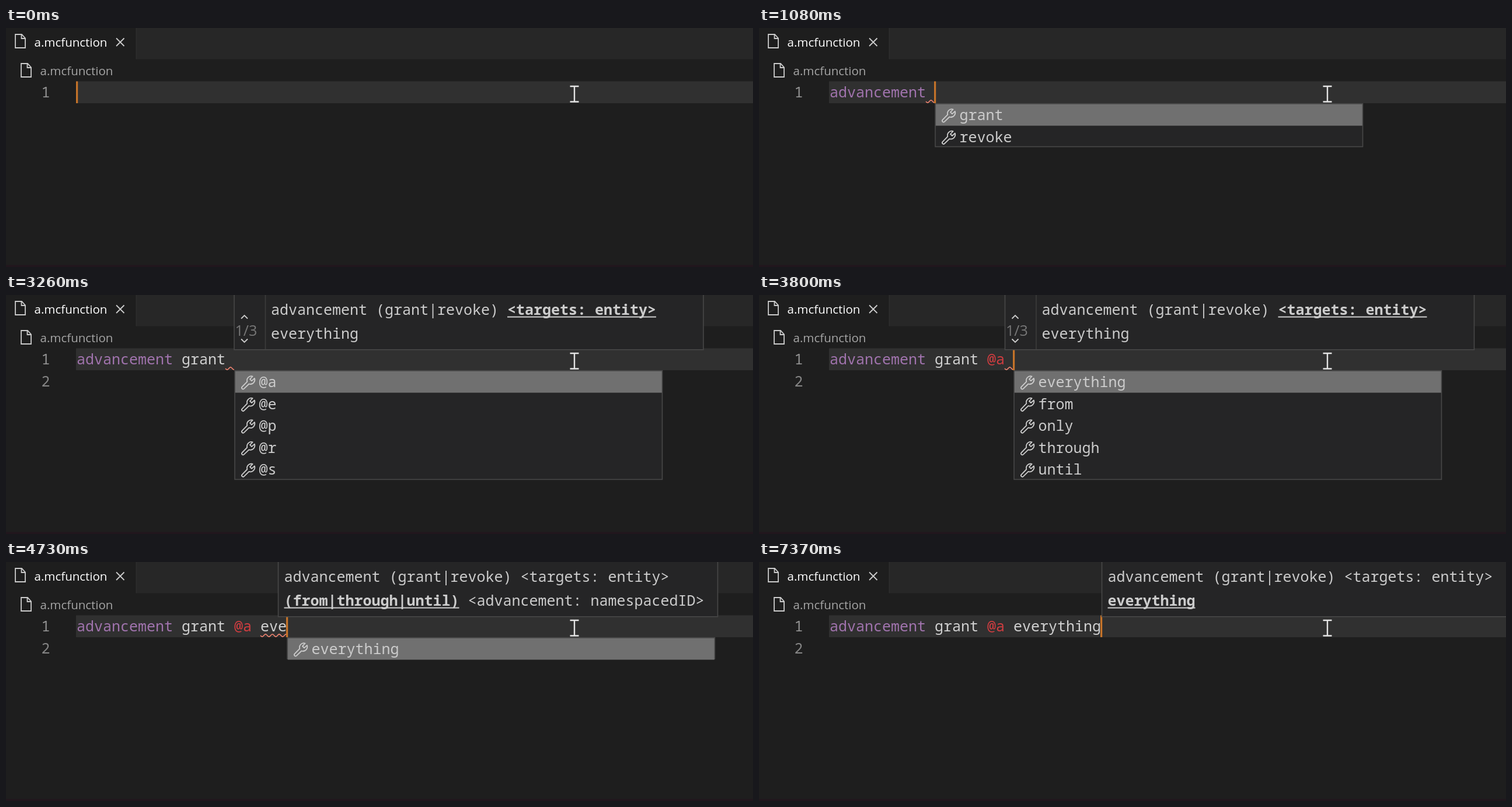
An HTML page that plays this animation: 1280x410 px, repeating every 7520 ms.

```html
<!DOCTYPE html>
<html lang="en">
<head>
<meta charset="utf-8">
<title>Command completion</title>
<style>
  html, body { margin: 0; width: 100%; height: 100%; overflow: hidden; background: #1e1e1e; }
  svg { display: block; width: 1280px; height: 410px; }
  text { white-space: pre; }
  .ui { font: 20.5px "Open Sans", "Noto Sans", sans-serif; }
  .code { font: 25px "Noto Sans Mono", "DejaVu Sans Mono", monospace; fill: #d0d0d0; }
  .bold { font-weight: 700; }
  .line { fill: none; stroke: #cccccc; stroke-width: 1.8; }
  .box { fill: #252526; stroke: #484848; stroke-width: 1.6; }
</style>
</head>
<body>
<svg viewBox="0 0 1280 410">
  <defs>
    <path id="page" class="line" d="M1 1H12L18 7.5V24H1ZM11.5 1V8H18"/>
    <path id="wrench" class="line" stroke-linejoin="round" d="M21.4 3.3 16.8 8.2 19.8 11.2 24.7 6.7C26.2 11.4 23 16.8 17.5 16.8Q16.2 16.6 15.2 16.3L6.5 24.7C4.4 26.6 1.4 23.6 3.3 21.5L12.1 12.4C10.5 7.5 15 1.4 21.4 3.3Z"/>
  </defs>
  <rect width="1280" height="410" fill="#1e1e1e"/>
  <rect x="223" width="1057" height="53.5" fill="#272727"/>
  <rect x="222.5" width="1.5" height="53.5" fill="#2d2d2d"/>
  <rect x="120" y="91.5" width="1160" height="37.5" fill="#303030"/>
  <rect y="406.5" width="1280" height="3.5" fill="#21161d"/>
  <use href="#page" x="15" y="10"/>
  <use href="#page" x="25" y="60"/>
  <text class="ui" x="48.5" y="32" fill="#ffffff">a.mcfunction</text>
  <text class="ui" x="58.5" y="81" fill="#a5a5a5">a.mcfunction</text>
  <path class="line" d="M189 17.5 202.5 31M202.5 17.5 189 31"/>
  <text class="code" x="60.5" y="119" style="fill:#949494">1</text>
  <g id="live"></g>
  <path d="M966.5 100H981.5M974 100V126.5M966.5 126.5H981.5" fill="none" stroke="#e4e4e4" stroke-width="2.4"/>
</svg>
<script>
const LOOP = 7520, LEFT = 121, CHAR = 15, ROW = 37.6;
const live = document.getElementById('live');
const colX = col => LEFT + col * CHAR;
const esc = s => s.replace(/&/g, '&amp;').replace(/</g, '&lt;');

// Parameter hints; *stars* mark the active parameter.
const HINTS = {
  action: { w: 680, lines: ['advancement *(grant|revoke)* <targets: entity>'] },
  target: { w: 805, pager: true, lines: ['advancement (grant|revoke) *<targets: entity>*', 'everything'] },
  range: { w: 754, lines: ['advancement (grant|revoke) <targets: entity>', '*(from|through|until)* <advancement: namespacedID>'] },
  all: { w: 754, lines: ['advancement (grant|revoke) <targets: entity>', '*everything*'] }
};
const SELECTORS = ['@a', '@e', '@p', '@r', '@s'];
const MODES = ['everything', 'from', 'only', 'through', 'until'];
const off = { caret: false }, on = { caret: true };

// [time, changes]: err is a column range, hint is [kind, x]; a new code shows the caret.
const steps = [
  [0, { code: '', err: null, list: null, hint: null, second: false }],
  [300, { code: 'a', err: [0, 1] }],
  [390, { code: 'ad', err: [0, 2], list: ['advancement'] }],
  [780, { code: 'advancement', err: [0, 11], list: null }],
  [1080, { code: 'advancement ', err: [11, 12], list: ['grant', 'revoke'] }],
  [1160, { hint: ['action', 302] }],
  [1540, off],
  [2080, { caret: true, second: true }],
  [2480, { code: 'advancement grant', err: [12, 17], list: null, hint: ['action', 357.5] }],
  [2550, { hint: ['action', 377] }],
  [2780, { code: 'advancement grant ', err: [17, 18], list: SELECTORS }],
  [2860, { hint: ['target', 391] }],
  [3260, off],
  [3330, { code: 'advancement grant @a', err: [19, 20], list: null }],
  [3420, { hint: ['target', 421.5] }],
  [3800, { code: 'advancement grant @a ', err: [20, 21], list: MODES }],
  [3880, { hint: ['target', 436.5] }],
  [4030, { hint: ['range', 436.5] }],
  [4350, off],
  [4500, { code: 'advancement grant @a e', err: [21, 22], list: ['everything'] }],
  [4580, { hint: ['range', 451.5] }],
  [4650, { code: 'advancement grant @a ev', err: [21, 23], hint: ['range', 466.5] }],
  [4730, { code: 'advancement grant @a eve', err: [21, 24] }],
  [4810, { hint: ['range', 481.5] }],
  [5220, { code: 'advancement grant @a everything', err: null, list: null }],
  [5440, { hint: ['range', 587.5] }],
  [5500, { hint: ['all', 587.5] }],
  [5810, off], [6360, on], [6820, off], [7370, on]
];

const states = [];
for (const [t, change] of steps) {
  const typed = 'code' in change ? on : {};
  states.push({ ...states[states.length - 1], ...typed, ...change, t });
}

function label(x, y, text, color = '#d0d0d0', cls = '') {
  return `<text class="code ${cls}" x="${x}" y="${y}" style="fill:${color}">${esc(text)}</text>`;
}

function code(text) {
  let out = '';
  for (const m of text.matchAll(/\S+/g)) {
    const color = m.index === 0 ? '#a073ad' : m[0][0] === '@' ? '#d13d40' : '#d0d0d0';
    out += label(colX(m.index), 119, m[0], color);
  }
  return out;
}

function squiggle([from, to]) {
  const pts = [];
  for (let x = 0; x <= (to - from) * CHAR; x++) {
    pts.push(`${colX(from) + x},${(126 + 2.1 * Math.sin(x * 2 * Math.PI / 11.7)).toFixed(2)}`);
  }
  return `<polyline points="${pts.join(' ')}" fill="none" stroke="#ee8370" stroke-width="1.6"/>`;
}

function popup(col, items) {
  const x = colX(col) + 1;
  let out = `<rect class="box" x="${x}" y="129.8" width="732.5" height="${items.length * ROW - 1.4}"/>` +
    `<rect x="${x + 0.8}" y="130.6" width="731" height="${ROW - 0.6}" fill="#707070"/>`;
  items.forEach((item, i) => {
    const y = i * ROW;
    out += `<use href="#wrench" x="${x + 9.2}" y="${136.2 + y}"/>` +
      label(x + 41.5, 158 + y, item, '#cccccc');
  });
  return out;
}

function hintLine(x, y, line) {
  let out = '';
  line.split('*').forEach((part, i) => {
    const w = part.length * CHAR;
    out += label(x, y, part, '#cccccc', i % 2 ? 'bold' : '');
    if (i % 2) out += `<rect x="${x}" y="${y + 2.6}" width="${w}" height="2" fill="#cccccc"/>`;
    x += w;
  });
  return out;
}

function hint([kind, x]) {
  const { w, pager, lines } = HINTS[kind];
  const top = lines.length > 1 ? -10 : 38;
  let out = `<rect class="box" x="${x}" y="${top}" width="${w - 1}" height="${93.8 - top}"/>`;
  if (pager) {
    out += `<path d="M${x + 53.5} 0V93" stroke="#3c3c3c" stroke-width="1.6"/>` +
      `<path class="line" d="M${x + 12} 40.5l5.5-5.5 5.5 5.5M${x + 12} 75.5l5.5 5.5 5.5-5.5"/>` +
      `<text class="ui" x="${x + 1.5}" y="70" style="font-size:25px" fill="#777777">1/3</text>`;
  }
  const textX = x + (pager ? 63 : 10);
  lines.forEach((line, i) => {
    out += hintLine(textX, 75 - 41 * (lines.length - 1 - i), line);
  });
  return out;
}

function draw(s) {
  const col = s.code.length;
  let out = s.second ? label(60.5, 156.6, '2', '#858585') : '';
  out += code(s.code);
  if (s.err) out += squiggle(s.err);
  if (s.caret) out += `<rect x="${colX(col) - 1}" y="91.5" width="3.2" height="37.5" fill="#c57329"/>`;
  if (s.list) out += popup(col, s.list);
  if (s.hint) out += hint(s.hint);
  live.innerHTML = out;
}

const start = performance.now();
let shown = null;
function tick() {
  const t = (performance.now() - start) % LOOP;
  const state = states.filter(s => s.t <= t).pop();
  if (state !== shown) draw(shown = state);
  requestAnimationFrame(tick);
}
tick();
</script>
</body>
</html>
```
